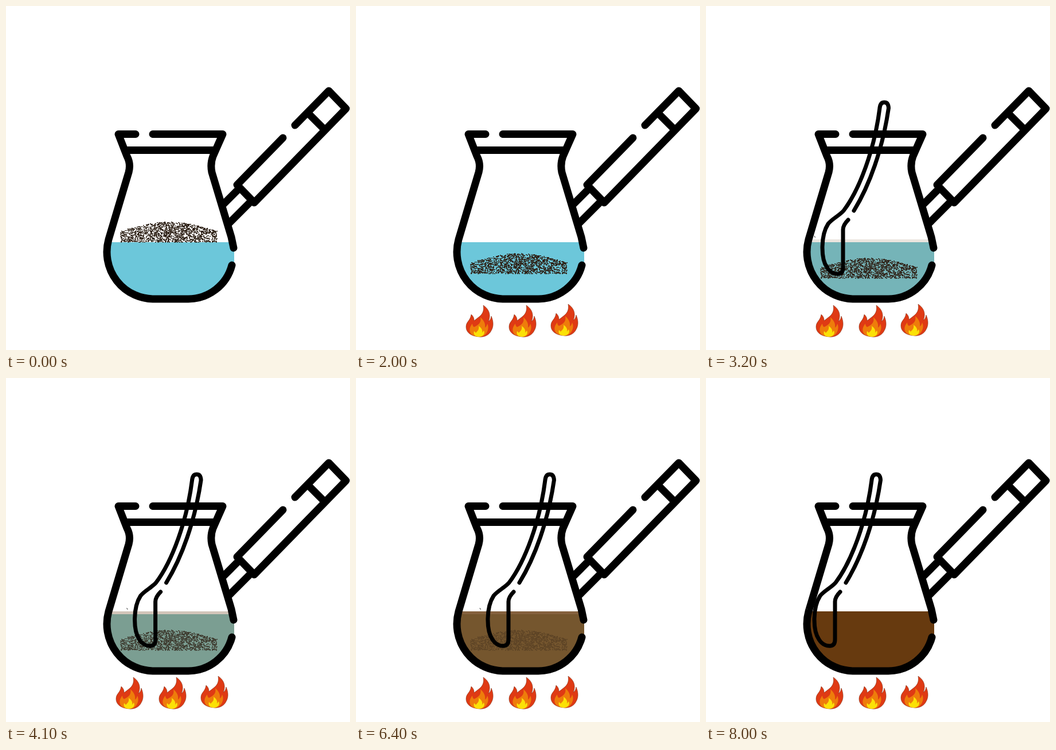
An HTML page that plays this animation: 600 by 600 pixels, repeating every 9 s.

```html
<!DOCTYPE html>
<html lang="en">
<head>
<meta charset="utf-8">
<title>Coffee pot</title>
<style>
  html, body { margin: 0; width: 100%; height: 100%; overflow: hidden; background: #fff; }
  svg { display: block; width: 100vw; height: 100vh; }
  .line { fill: none; stroke: #000; stroke-linecap: round; stroke-linejoin: round; }
</style>
</head>
<body>
<svg viewBox="0 0 600 600">
  <defs>
    <g id="flame">
      <path fill="#df3a14" stroke="#7c2a12" stroke-width=".6" d="M222 522C234 530 235 541 231 550Q235 548 236 541C241 553 239 561 236 566C232 575 222 578 215 577C200 576 192 569 192 560C192 550 199 550 201 538Q206 542 206 549C214 542 225 538 222 522Z"/>
      <path fill="#ee7c0b" d="M217 543C224 549 226 555 225 561Q228 559 229 554C233 562 229 571 223 575C215 578 207 577 202 573C196 567 198 560 203 554Q203 558 206 560C214 556 219 552 217 543Z"/>
      <path fill="#fbe106" d="M214 558C219 562 221 565 220 570L223 566C226 572 221 577 215 577C208 577 204 573 206 567L209 570C213 566 215 564 214 558Z"/>
    </g>
  </defs>

  <path id="foam" d="M179 407H397V413H179Z"/>
  <path id="water" d="M178 412H398V447Q388 500 318 508H260Q180 500 178 412Z"/>
  <path id="grounds" fill="#2d2015"/>

  <g class="line" stroke-width="13">
    <path d="M226 223.500H196L211 262Q218 275 214 290L179 407A82 82 0 0 0 260 511H318A79 79 0 0 0 394 452"/>
    <path d="M256 223.500H378L361 262Q356 275 359 290L393 403L397 422M210 251.500H363"/>
    <path d="M504 208L563 148L593 179L433 343L403 312L483 230M528 188L554 214M406 319L380 345M426 342L388 380"/>
  </g>

  <g id="spoon">
    <path class="line" stroke-width="7" d="M244 357C271 313 294 250 304.500 178Q304 168 297 168Q290 168 289 178C280 250 254 320 226 357C218 366 206 371 199 380C186 400 186 440 197 456C203 466 212 468 218 467Q225 466 225 456V390Q225 382 234 373"/>
    <path d="M175 401l1.500 3" stroke="#333"/>
  </g>

  <g id="fire">
    <use href="#flame"/>
    <use href="#flame" x="75"/>
    <use href="#flame" x="148" y="-2"/>
  </g>
</svg>
<script>
const $ = id => document.getElementById(id);
const clamp = v => Math.min(1, Math.max(0, v));
const mix = (a, b, u) => a + (b - a) * u;

let seed = 7;
const rand = () => (seed = seed * 16807 % 2147483647) / 2147483647;

// A low mound of grains, some of them gathered near its middle.
function makeGrounds() {
  let d = '';
  for (let i = 0; i < 1500; i++) {
    const u = i % 4 ? rand() : .5 + (rand() + rand() - 1) * .35;
    const height = 19 + 16 * Math.sin(Math.PI * u);
    const x = Math.round(199 + 168 * u), y = Math.round(411 - height * rand());
    d += `M${x} ${y}h2v1.600h-2z`;
  }
  return d;
}
$('grounds').setAttribute('d', makeGrounds());

const blue = [108, 199, 218], white = [255, 255, 255], coffee = [103, 58, 15];
const depth = [0, 16, 55, 63, 63];  // sinking of the grounds at each second

// Blend towards coffee; tint shifts the halfway colour.
const brew = (from, u, tint = [0, 0, 0]) =>
  `rgb(${from.map((c, i) => Math.round(mix(c, coffee[i], u) + 4 * u * (1 - u) * tint[i]))})`;

function sink(s) {
  const i = Math.min(3, Math.floor(s));
  return mix(depth[i], depth[i + 1], clamp(s - i));
}

function draw(s) {
  const p = clamp((s - 2) / 6);
  const u = p - .07 * Math.sin(2 * Math.PI * p);
  const stir = Math.min(24 * Math.max(3, s) - 62.8, 25.6 * (8 - s));

  $('fire').setAttribute('opacity', clamp(s));
  $('spoon').setAttribute('opacity', clamp(s - 2));
  $('spoon').setAttribute('transform', `translate(${stir} 0)`);
  $('grounds').setAttribute('opacity', 1 - clamp((s - 3) / 5));
  $('grounds').setAttribute('transform', `translate(0 ${sink(s)})`);
  $('water').setAttribute('fill', brew(blue, u, [20, 0, -15]));
  $('foam').setAttribute('fill', brew(white, u));
}

// Ten steps a second for eight seconds, then a one-second rest.
const start = performance.now();
function loop() {
  const t = (performance.now() - start) % 9000;
  draw(Math.min(80, Math.floor(t / 100)) / 10);
  requestAnimationFrame(loop);
}
loop();
</script>
</body>
</html>
```
